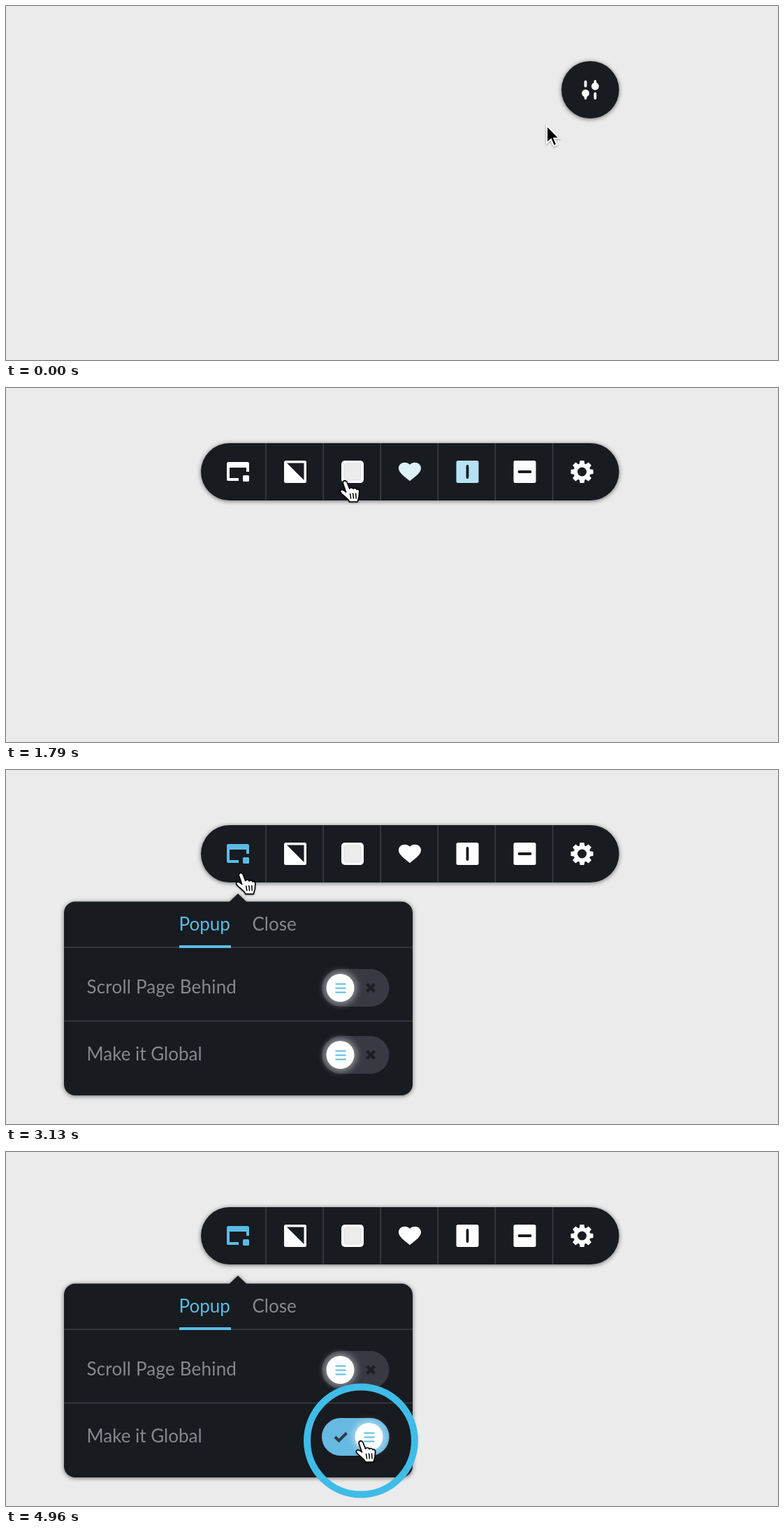
Animation of 1105 by 507 pixels, one loop 5000 ms. Source, as an HTML page:

```html
<!DOCTYPE html>
<html lang="en">
<head>
<meta charset="utf-8">
<title>Toolbar popup</title>
<style>
  html, body { margin: 0; width: 100%; height: 100%; overflow: hidden; background: #ebebeb; }
  svg { display: block; width: 1105px; height: 507px; }
  text { font: 26px Lato, "Open Sans", sans-serif; fill: #85888c; }
  .dark { fill: #181b20; }
  .shadow { filter: drop-shadow(0 1px 3px rgba(0, 0, 0, .55)); }
  .blue { fill: #5bbce4; }
  .rule { stroke: #3b3e43; stroke-width: 1.6; }
  .icon { fill: currentColor; color: #fff; }
  .line { fill: none; stroke: currentColor; }
  .bar { stroke: #181b20; stroke-width: 3.8; stroke-linecap: round; }
</style>
</head>
<body>
<svg viewBox="0 0 1105 507">
  <defs>
    <clipPath id="clip"><rect id="clipRect" y="79" height="82" rx="41"/></clipPath>
    <filter id="glow" x="-60%" y="-60%" width="220%" height="220%"><feGaussianBlur stdDeviation="4"/></filter>
    <g id="knob">
      <circle r="24" fill="#fff" opacity=".4" filter="url(#glow)"/>
      <circle r="20" fill="#fff"/>
      <path d="M-7-5.5H8M-7 .5H8M-7 6.5H8" stroke="#5bbce4" stroke-width="1.8"/>
    </g>
    <g id="off">
      <rect x="452" y="-27" width="96.500" height="54" rx="27" fill="#373a43"/>
      <path d="M516.500-5.500l11 11m0-11l-11 11" stroke="#1c1f24" stroke-width="4.500"/>
    </g>
  </defs>

  <g class="shadow"><rect id="pill" class="dark" y="79" height="82" rx="41"/></g>
  <g clip-path="url(#clip)">
    <g id="tools">
      <path id="rules" class="rule"/>
      <g class="icon">
        <path class="line" d="M333 131H318V109H346V120" stroke-width="4" stroke-linejoin="round"/>
        <rect x="316" y="106" width="32" height="8" rx="2.500"/>
        <rect x="339" y="125" width="9" height="9" rx="1.500"/>
      </g>
      <g class="icon">
        <rect x="398" y="104" width="32" height="32" rx="2.500"/>
        <path class="dark" d="M402 107.500H426.500V132z"/>
      </g>
      <g class="icon">
        <rect x="480" y="104" width="32" height="32" rx="5"/>
        <rect x="484" y="108" width="24" height="24" rx="3" fill="#ececec" stroke="#ddd"/>
      </g>
      <g class="icon">
        <path transform="translate(578 120) scale(1.6 1.45) translate(-12 -12.2)" d="M12 21.350l-1.450-1.320C5.400 15.360 2 12.280 2 8.500 2 5.420 4.420 3 7.500 3c1.740 0 3.410.810 4.500 2.090C13.090 3.810 14.760 3 16.500 3 19.580 3 22 5.420 22 8.500c0 3.780-3.400 6.860-8.550 11.540z"/>
      </g>
      <g class="icon">
        <rect x="644.500" y="104" width="32" height="32" rx="2.500"/>
        <path class="bar" d="M660.500 112V128"/>
      </g>
      <g class="icon">
        <rect x="726.500" y="104" width="32" height="32" rx="2.500"/>
        <path class="bar" d="M734.500 120H750.500"/>
      </g>
      <g class="icon" id="gear" transform="translate(824.5 120)">
        <circle class="line" r="9.300" stroke-width="5.600"/>
      </g>
    </g>
    <g class="icon" id="sliders">
      <path class="line" d="M829.500 108.500V114.500M829.500 125V132M843.300 108V115M843.300 125.500V132" stroke-width="3.800" stroke-linecap="round"/>
      <circle cx="829.500" cy="125" r="5.400"/>
      <circle cx="843.300" cy="115" r="5.400"/>
    </g>
  </g>

  <g id="popup">
    <path class="dark shadow" d="M99 188.500H320L332 177L344 188.500H566a16 16 0 0 1 16 16V450a16 16 0 0 1-16 16H99a16 16 0 0 1-16-16V204.500a16 16 0 0 1 16-16z"/>
    <path class="rule" d="M83 254H582M83 359.500H582"/>
    <rect class="blue" x="248" y="251" width="74" height="4"/>
    <text x="247.500" y="230" style="fill:#5bbce4">Popup</text>
    <text x="352.500" y="230" id="close">Close</text>
    <text x="115.500" y="320" letter-spacing=".2">Scroll Page Behind</text>
    <text x="115.500" y="416">Make it Global</text>
    <use href="#off" y="312"/>
    <use href="#knob" x="478.500" y="312"/>
    <use href="#off" y="408"/>
    <g id="on">
      <rect x="452" y="381" width="96.500" height="54" rx="27" fill="#66b9e1"/>
      <path d="M471 408l5.500 5.500L487.500 402.500" fill="none" stroke="#2b3c48" stroke-width="4"/>
    </g>
    <use href="#knob" id="switch" y="408"/>
  </g>

  <circle id="ring" fill="none" stroke="#3fbce8" stroke-width="10" cx="508" cy="413.500"/>

  <g id="cursor">
    <path id="arrow" d="M0 0V25.500L6 20L10 29.500L14.500 27.500L10.500 18.500H18z" fill="#000" stroke="#fff" stroke-width="2.200" style="filter:drop-shadow(0 1px 1px #0006)"/>
    <g id="hand" stroke="#000" stroke-linecap="round" style="filter:drop-shadow(0 1px 1px #0006)">
      <path d="M-2 3C-2-1 3-1 4 2L7.500 11C9 9 12 9 13 11.500C14 10 17 10 18 12.500C20 11 22 13 21.500 16L21 23L19 30H7.500L6 27L-4 18C-8 14 -4 11 0 14L2.500 16z" fill="#fff" stroke-width="1.600" stroke-linejoin="round"/>
      <path d="M8.500 18.500L9.500 25M12.500 18L13.300 25M16.500 18L17 25" stroke-width="1.500"/>
    </g>
  </g>
</svg>
<script>
const $ = id => document.getElementById(id);
const set = (id, attrs) => { for (const k in attrs) $(id).setAttribute(k, attrs[k]); };
const ramp = (t, a, b) => Math.min(1, Math.max(0, (t - a) / (b - a)));
const smooth = u => u * u * (3 - 2 * u);
const easeOut = u => 1 - (1 - u) ** 2;
const tint = (el, prop, u, base) =>
  el.style[prop] = `color-mix(in srgb, #5bbce4 ${u * 100}%, ${base})`;

// Pointer path: time, x, y
const path = [
  [0, 774, 171], [235, 774, 171], [590, 833, 122], [1350, 833, 122], [1420, 820, 122],
  [1790, 485, 133], [1960, 344, 143], [2090, 334, 145], [3090, 334, 145], [3340, 364, 205],
  [3600, 430, 306], [3790, 455, 342], [4050, 499, 404], [4170, 507, 414], [5000, 507, 414]
];
const slope = (i, k) => (path[i + 1][k] - path[i][k]) / (path[i + 1][0] - path[i][0]);
function tangent(i, k) {
  if (i === 0 || i === path.length - 1) return 0;
  const a = slope(i - 1, k), b = slope(i, k);
  return a * b > 0 ? 2 * a * b / (a + b) : 0;
}
function pointer(t) {
  let i = 0;
  while (i < path.length - 2 && t >= path[i + 1][0]) i++;
  const d = path[i + 1][0] - path[i][0], u = (t - path[i][0]) / d, v = 1 - u;
  return [1, 2].map(k =>
    path[i][k] * v * v * (1 + 2 * u) + path[i + 1][k] * u * u * (1 + 2 * v) +
    d * u * v * (tangent(i, k) * v - tangent(i + 1, k) * u));
}

// Brief tint left behind when the pointer sweeps across a button
const sweep = age => .45 * ramp(age, 60, 240) * (1 - ramp(age, 240, 330));

function clickable(t, x, y) {
  if (t < 920) return Math.hypot(x - 836, y - 120) < 41;
  if (y < 161) return true;
  return (x > 353 && x < 415 && y > 196 && y < 252) || y > 381;
}

for (let a = 0; a < 360; a += 45)
  $("gear").insertAdjacentHTML("beforeend",
    `<path d="M-4-10L-3-16H3L4-10z" transform="rotate(${a})"/>`);
set("rules", { d: [0, 1, 2, 3, 4, 5].map(i => `M${372 + 82.1 * i} 79v82`).join("") });
const icons = document.querySelectorAll("#tools > .icon");

function draw(t) {
  const open = easeOut(ramp(t, 900, 1110));
  const left = 795 - 516 * open;
  for (const id of ["pill", "clipRect"]) set(id, { x: left, width: 877.5 - left });
  set("tools", { opacity: ramp(t, 900, 1000) });
  set("sliders", { opacity: 1 - ramp(t, 900, 1000) });
  tint($("sliders"), "color", ramp(t, 440, 590), "#fff");

  icons.forEach((icon, i) => {
    let u = sweep(t - 1465 - 90 * (5 - i));
    if (i === 0) u = ramp(t, 1980, 2130);
    if (i === 6) u = ramp(t, 1105, 1350) * (1 - ramp(t, 1460, 1640));
    tint(icon, "color", u, "#fff");
  });

  const show = t < 2500 ? 0 : ramp(t, 2482, 2630);
  set("popup", { opacity: show, transform: `translate(0 ${20 * (1 - show)})` });
  tint($("close"), "fill", ramp(t, 3330, 3480) * (1 - ramp(t, 3520, 3750)), "#85888c");

  const on = smooth(ramp(t, 4410, 4610));
  set("on", { opacity: on });
  set("switch", { x: 478.5 + 41 * on });
  set("ring", { r: 77 * easeOut(ramp(t, 4410, 4970)), opacity: t < 4420 ? 0 : 1 });

  const [x, y] = pointer(t), hand = clickable(t, x, y);
  set("cursor", { transform: `translate(${x} ${y})` });
  set("hand", { opacity: +hand });
  set("arrow", { opacity: +!hand });
}

function tick() {
  draw(performance.now() % 5000);
  requestAnimationFrame(tick);
}
tick();
</script>
</body>
</html>
```
